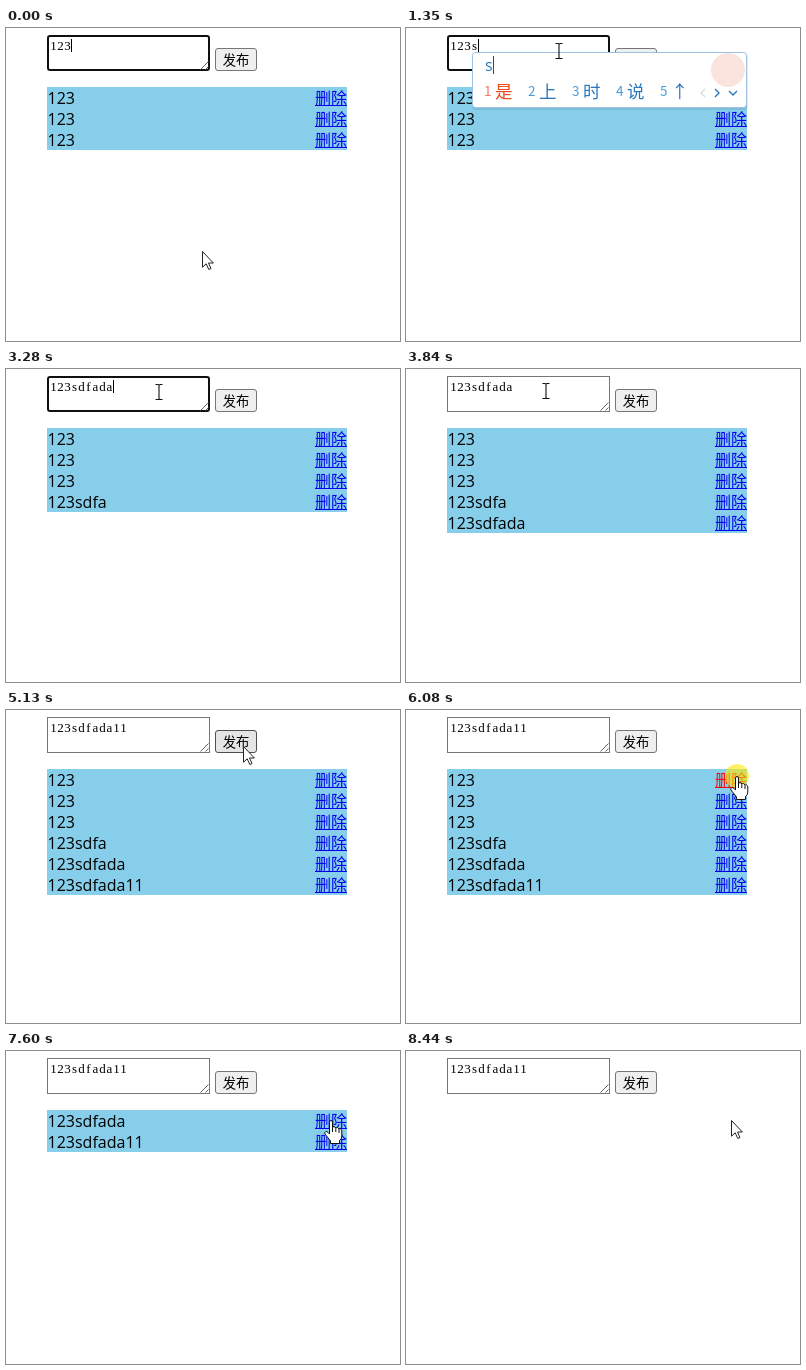
Animation of 394 by 313 pixels, one loop 9 s. Source, as an HTML page:

```html
<!DOCTYPE html>
<html lang="zh-CN">
<head>
<meta charset="utf-8">
<title>发布</title>
<style>
html, body { margin: 0; width: 100%; height: 100%; overflow: hidden; background: #fff; }
svg { display: block; width: 394px; height: 313px; }
.area { font: 13px "Liberation Serif", serif; text-anchor: middle; }
.row { font: 16px "Open Sans", "Noto Sans CJK SC", "Noto Sans CJK", sans-serif; }
.cjk { font-family: "Noto Sans CJK SC", "Noto Sans CJK", sans-serif; }
</style>
</head>
<body>
<svg id="stage" viewBox="0 0 394 313"></svg>
<script>
const LOOP = 9000;
const svg = document.getElementById('stage');

function el(tag, attrs = {}, parent = svg, text) {
  const node = document.createElementNS('http://www.w3.org/2000/svg', tag);
  set(node, attrs);
  if (text !== undefined) node.textContent = text;
  parent.appendChild(node);
  return node;
}
function set(node, attrs) {
  for (const key in attrs) node.setAttribute(key, attrs[key]);
}
function show(node, on) {
  node.style.display = on ? '' : 'none';
}

// Timeline
const typing = [[0, '123'], [1240, '123s'], [1400, '123sd'], [1430, '123sdf'], [1600, '123sdfa'],
  [3120, '123sdfad'], [3200, '123sdfada'], [4380, '123sdfada1'], [4600, '123sdfada11']];
const added = [[0, '123'], [0, '123'], [0, '123'], [2360, '123sdfa'], [3550, '123sdfada'], [5075, '123sdfada11']];
const deleted = [6210, 6700, 7080, 7600, 8010, 8440];
const focused = [[0, 2310], [2910, 3500], [3970, 5020]];
const presses = [[2310, 2470], [2910, 2950], [3500, 3600], [3970, 4050], [5020, 5130],
  [6080, 6210], [6570, 6700], [6950, 7080], [7480, 7600], [7900, 8010], [8360, 8440]];
const path = [[0, 196, 223], [330, 196, 223], [1110, 153, 23], [1980, 153, 23], [2140, 240, 33],
  [2470, 240, 33], [2900, 148, 22], [3250, 148, 22], [3460, 238, 33], [3600, 238, 33],
  [3840, 140, 22], [3960, 140, 22], [3970, 138, 21], [4640, 138, 21], [4850, 237, 36],
  [5300, 237, 36], [5740, 306, 145], [6080, 331, 66], [7120, 331, 66], [7440, 324.5, 69], [9000, 324.5, 69]];

const within = (spans, t) => spans.some(([a, b]) => t >= a && t < b);
const latest = (steps, t) => steps.filter(s => t >= s[0]).pop()[1];

function pointer(t) {
  let i = 1;
  while (i < path.length - 1 && t >= path[i][0]) i++;
  const [t0, x0, y0] = path[i - 1], [t1, x1, y1] = path[i];
  const k = (t - t0) / (t1 - t0), e = k * k * (3 - 2 * k);
  return [x0 + (x1 - x0) * e, y0 + (y1 - y0) * e];
}

// Text area
const box = el('rect', { fill: '#fff' });
el('path', { d: 'M194.5 41.5l8-8M199.5 41.5l3-3', stroke: '#666', fill: 'none' });
const areaText = el('text', { class: 'area', y: 22 });
const caret = el('rect', { y: 11, width: 1, height: 13 });

// Button
const button = el('rect', { x: 209.5, y: 20.5, width: 41, height: 22, rx: 2.5 });
el('text', { class: 'cjk', x: 216.7, y: 37, 'font-size': 13.33 }, svg, '发布');

// List
const rows = added.map((_, i) => {
  const g = el('g', { class: 'row', transform: `translate(41 ${59 + 21 * i})` });
  el('rect', { width: 300, height: 21, fill: '#87ceeb' }, g);
  const label = el('text', { x: 0.5, y: 17 }, g);
  const link = el('g', {}, g);
  el('text', { class: 'cjk', x: 268, y: 17 }, link, '删除');
  el('rect', { x: 268, y: 18, width: 32, height: 1 }, link);
  return { g, label, link };
});

// Input method popup
function popup(width, words) {
  const g = el('g', { class: 'cjk' });
  const right = 66 + width;
  el('rect', { x: 66, y: 25, width: width + 1, height: 57, rx: 4, fill: '#000', opacity: 0.08 }, g);
  el('rect', { x: 66.5, y: 24.5, width: width - 1, height: 55, rx: 3, fill: '#fff', stroke: '#9fc1e3' }, g);
  el('circle', { cx: right - 19, cy: 42, r: 17, fill: '#fce4de' }, g);
  const typed = el('text', { x: 79, y: 43, 'font-size': 16, fill: '#2a7ab8', style: 'font-family:"Open Sans",sans-serif' }, g);
  const bar = el('rect', { y: 28, width: 1, height: 18, fill: '#244a70' }, g);
  let x = 78;
  words.forEach((word, i) => {
    el('text', { x, y: 68, 'font-size': 13.5, fill: i ? '#4b9bd8' : '#f4776b' }, g, i + 1);
    el('text', { x: x + 11, y: 69.5, 'font-size': 17.5, fill: i ? '#2a78bc' : '#e9491c' }, g, word);
    x += 26.5 + 17.5 * word.length;
  });
  const arrows = { fill: 'none', 'stroke-width': 1.4 };
  el('path', { ...arrows, d: `M${right - 42} 61l-4 4 4 4`, stroke: '#d3dde6' }, g);
  el('path', { ...arrows, d: `M${right - 32} 61l4 4-4 4M${right - 18} 63l4 4 4-4`, stroke: '#2a78bc' }, g);
  return { g, typed, bar };
}
const narrow = popup(275, ['是', '上', '时', '说', '↑']);
const wide = popup(328, ['是的', '速度', '深度', '时代']);

function drawPopup(p, on, word) {
  show(p.g, on);
  if (!on) return;
  p.typed.textContent = word;
  set(p.bar, { x: Math.round(79 + p.typed.getComputedTextLength()) });
}

// Pointer
const halo = el('circle', { r: 12, fill: '#ffea00', opacity: 0.6 });
const cursors = { arrow: el('g'), beam: el('g'), hand: el('g') };
el('path', { d: 'M.5 .5V16.2L4.2 12.8 6.8 18.5 9 17.5 6.5 12H11.4Z', fill: '#fff', stroke: '#222' }, cursors.arrow);
const beam = 'M-3.5 -7.5H-1Q0 -7.5 0 -6.5Q0 -7.5 1 -7.5H3.5M0 -7V7M-3.5 7.5H-1Q0 7.5 0 6.5Q0 7.5 1 7.5H3.5';
el('path', { d: beam, fill: 'none', stroke: '#111', 'stroke-width': 1.1 }, cursors.beam);
el('path', {
  d: 'M-1.5 14V2Q-1.5 .5 0 .5T1.5 2V8Q1.5 6.5 3 6.5T4.8 8.5Q5 7.3 6.3 7.5T8 9.5Q8.3 8.5 9.5 9T10.8 11V16Q10.8 19 8.5 20.5V23.5H-.5V21L-6 14Q-6.8 12.5 -5.4 11.7T-3 12.5Z',
  fill: '#fff', stroke: '#111', 'stroke-linejoin': 'round'
}, cursors.hand);
el('path', { d: 'M1.5 8V12M4.8 9V12M8 10V13', fill: 'none', stroke: '#111' }, cursors.hand);

function draw(t) {
  const [x, y] = pointer(t);
  const text = latest(typing, t);
  const focus = within(focused, t);
  const press = within(presses, t);
  const gone = deleted.filter(d => t >= d).length;
  const items = added.filter(a => t >= a[0]).slice(gone);

  set(box, focus
    ? { x: 42, y: 8, width: 161, height: 34, rx: 2, stroke: '#101010', 'stroke-width': 2 }
    : { x: 41.5, y: 7.5, width: 162, height: 35, rx: 0, stroke: '#767676', 'stroke-width': 1 });
  areaText.textContent = text;
  set(areaText, { x: [...text].map((_, i) => 47.5 + 7 * i).join(' ') });
  set(caret, { x: 44 + 7 * text.length });
  show(caret, focus && !(t >= 530 && t < 1060));

  const overButton = x >= 209 && x <= 251 && y >= 20 && y <= 43;
  set(button, { fill: overButton ? '#e5e5e5' : '#efefef', stroke: overButton ? '#4f4f4f' : '#767676' });

  const overRow = x >= 309 && x <= 341 && y >= 59 ? Math.floor((y - 59) / 21) : -1;
  rows.forEach((row, i) => {
    show(row.g, i < items.length);
    if (i >= items.length) return;
    row.label.textContent = items[i][1];
    set(row.link, { fill: press && i === overRow ? '#f00' : '#00e' });
  });

  const composing = t >= 1240 && t < 1980, word = text.slice(3);
  drawPopup(narrow, composing && word.length === 1, word);
  drawPopup(wide, composing && word.length > 1, word);

  const overArea = x >= 41 && x <= 204 && y >= 7 && y <= 43;
  const kind = overArea ? 'beam' : overRow >= 0 && overRow < items.length ? 'hand' : 'arrow';
  for (const name in cursors) show(cursors[name], name === kind);
  set(cursors[kind], { transform: `translate(${Math.round(x)} ${Math.round(y)})` });
  show(halo, press);
  set(halo, { cx: x, cy: y });
}

const start = performance.now();
function tick() {
  draw((performance.now() - start) % LOOP);
  requestAnimationFrame(tick);
}
tick();
</script>
</body>
</html>
```
